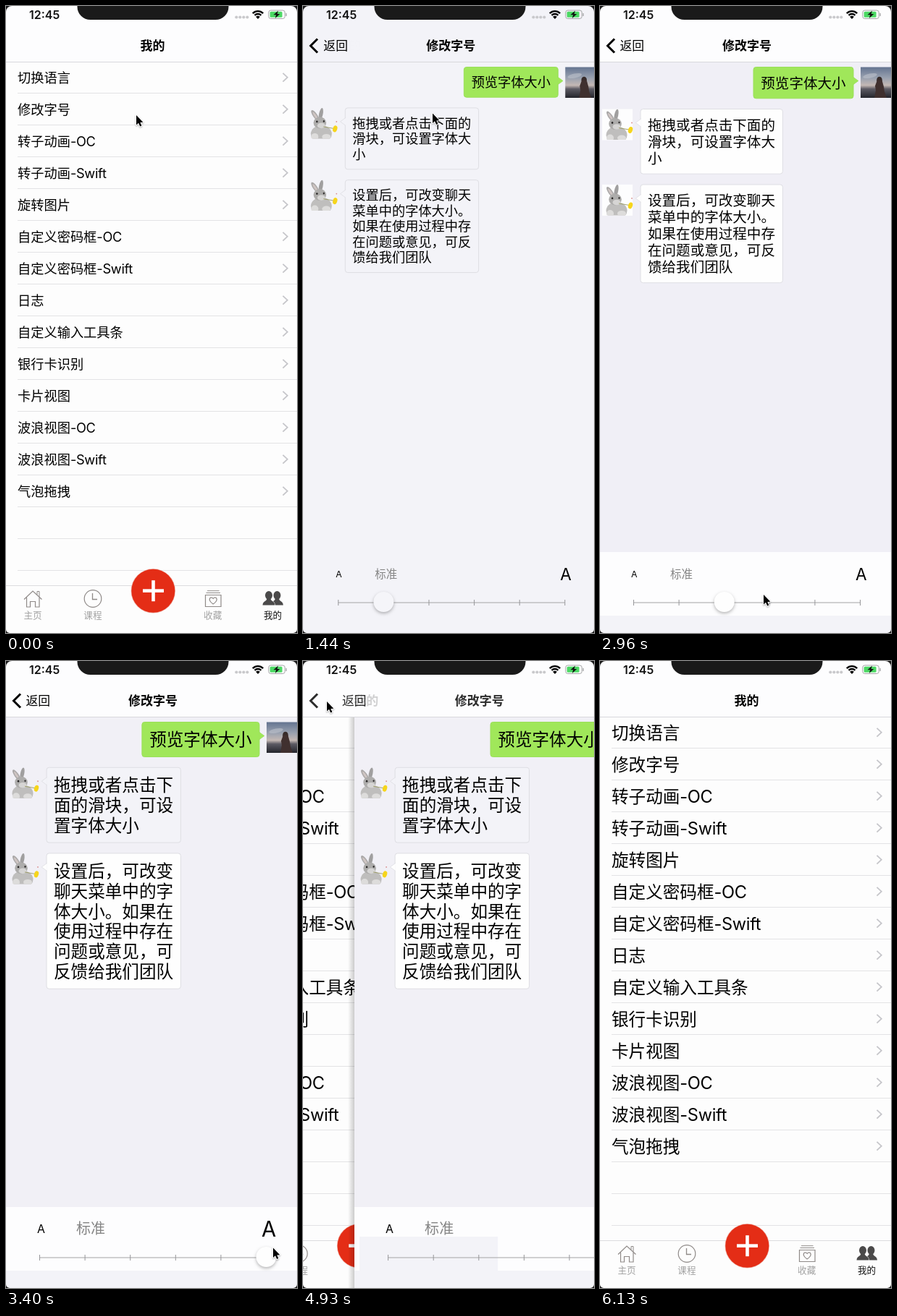
Write an HTML page with a canvas that moves like this. It is 402 by 867 pixels and loops after 6.48 s.

```html
<!DOCTYPE html>
<html lang="zh-CN">
<head>
<meta charset="utf-8">
<style>
html, body { margin: 0; width: 100%; height: 100%; overflow: hidden; background: #fdfdfd; }
canvas { display: block; width: 402px; height: 867px; }
</style>
</head>
<body>
<canvas id="stage" width="402" height="867"></canvas>
<script>
const c = document.getElementById('stage').getContext('2d');
const W = 402, H = 867, LOOP = 6480;
const FONT = 'Inter, "Noto Sans CJK SC", "Noto Sans CJK", sans-serif';
const ROWS = ['切换语言', '修改字号', '转子动画-OC', '转子动画-Swift', '旋转图片',
  '自定义密码框-OC', '自定义密码框-Swift', '日志', '自定义输入工具条', '银行卡识别',
  '卡片视图', '波浪视图-OC', '波浪视图-Swift', '气泡拖拽'];
const MESSAGES = ['拖拽或者点击下面的滑块，可设置字体大小',
  '设置后，可改变聊天菜单中的字体大小。如果在使用过程中存在问题或意见，可反馈给我们团队'];
const PUSH = [1020, 1080, 1200, 1320, 1440, 1550];
const POP = [4930, 5020, 5130, 5230, 5320];
const TICK = 62.6, SLIDER_X = 46.5;

// Pointer moves: start, end, steps, target x, target y, sideways bulge
const MOVES = [
  [290, 490, 3, 179, 149.5, 0], [670, 670, 1, 179, 148.5, 0],
  [1700, 2260, 10, 121.5, 818, 40], [2380, 2380, 1, 121.5, 818.5, 0],
  [2790, 2960, 3, 226, 814, 0], [3050, 3400, 7, 369, 811.5, 0],
  [3450, 3450, 1, 370, 811, 0], [3720, 3980, 5, 20, 101, -12],
  [4300, 4300, 1, 30.5, 65.5, 0], [4510, 4510, 1, 33, 56, 0],
  [5560, 5780, 5, 262, 829, 0], [6020, 6130, 3, 330, 880, 0]
];

const sizeAt = i => (17 + 1.25 * (i - 1)) * W / 375;
const spring = t => t <= 0 ? 1 : (1 + 0.019 * t) * Math.exp(-0.019 * t);
const hold = (times, t) => times.reduce((a, b) => b <= t ? b : a, times[0]);

function pointer(t) {
  let x = 180, y = 151;
  for (const [a, b, n, tx, ty, bulge] of MOVES) {
    if (t < a) break;
    const k = b > a ? Math.min(n, Math.floor((t - a) / (b - a) * (n - 1) + 1e-6) + 1) : n;
    const u = k / n;
    const p = Math.abs(ty - y) > 100 ? u * u * (3 - 2 * u) : u;
    x += (tx - x) * p + bulge * Math.sin(Math.PI * p);
    y += (ty - y) * p;
  }
  return [x, y];
}

// Offset of the chat page from its resting place
function pageX(t) {
  if (t < PUSH[1]) return W;
  if (t < 1550) return W * spring(hold(PUSH, t) - 1056.8);
  if (t < POP[0]) return 0;
  if (t < 5230) return W * (1 - spring(hold(POP, t) - 4890));
  return W;
}

function text(s, x, y, size, color = '#000', weight = 400, align = 'left') {
  c.font = `${weight} ${size}px ${FONT}`;
  c.fillStyle = color;
  c.textAlign = align;
  c.fillText(s, x, y + size * 0.37);
}

function rect(x, y, w, h, color) {
  c.fillStyle = color;
  c.fillRect(x, y, w, h);
}

function line(points, color, width, close) {
  c.beginPath();
  points.forEach(([x, y], i) => i ? c.lineTo(x, y) : c.moveTo(x, y));
  if (close) c.closePath();
  c.strokeStyle = color;
  c.lineWidth = width;
  c.stroke();
}

function poly(points, color) {
  c.beginPath();
  points.forEach(([x, y]) => c.lineTo(x, y));
  c.fillStyle = color;
  c.fill();
}

function oval(x, y, rx, ry, color, turn = 0) {
  c.beginPath();
  c.ellipse(x, y, rx, ry, turn, 0, Math.PI * 2);
  c.fillStyle = color;
  c.fill();
}

function at(x, y, draw) {
  c.save();
  c.translate(x, y);
  draw();
  c.restore();
}

function tabBar() {
  const gray = '#8f8a88';
  rect(0, 801, W, 66, '#fdfdfd');
  rect(0, 801, W, 1, '#dcdcdf');

  line([[25, 820.5], [37, 809], [49.5, 820.5]], gray, 1.2);
  line([[28.5, 818], [28.5, 831], [33.5, 831], [33.5, 823.5], [40.5, 823.5], [40.5, 831],
    [46, 831], [46, 818]], gray, 1.2);
  line([[43, 814], [43, 809.5], [46, 809.5], [46, 817]], gray, 1);

  c.beginPath();
  c.arc(120, 819.5, 11.8, 0, 7);
  c.lineWidth = 1.2;
  c.stroke();
  line([[119.5, 812], [119.5, 820.5], [126, 820.5]], gray, 1.3);

  line([[278, 808.7], [294.5, 808.7]], gray, 1);
  line([[276.5, 811.5], [296, 811.5]], gray, 1);
  line([[275.5, 814.5], [297, 814.5], [297, 830.5], [275.5, 830.5]], gray, 1.2, true);
  c.beginPath();
  c.moveTo(286.2, 827);
  c.bezierCurveTo(277, 820.5, 283, 815, 286.2, 819.5);
  c.bezierCurveTo(289.4, 815, 295.4, 820.5, 286.2, 827);
  c.stroke();

  for (const x of [374.5, 363]) {
    c.beginPath();
    c.ellipse(x, 815, 5, 6, 0, 0, 7);
    c.moveTo(x - 8.5, 828.5);
    c.bezierCurveTo(x - 8, 822, x - 3, 824, x - 2.5, 819);
    c.lineTo(x + 2.5, 819);
    c.bezierCurveTo(x + 3, 824, x + 8, 822, x + 8.5, 828.5);
    c.closePath();
    c.strokeStyle = '#fdfdfd';
    c.lineWidth = 1.2;
    c.stroke();
    c.fillStyle = '#4b4a4a';
    c.fill();
  }
  ['主页', '课程', '', '收藏', '我的'].forEach((s, i) =>
    text(s, 37 + i * 82.9, 842.5, 12.6, i == 4 ? '#111' : '#a2a2a2', 400, 'center'));

  oval(203.3, 808.8, 30.7, 30.7, '#efb0a6');
  oval(203.3, 808.8, 30, 30, '#e42d16');
  rect(189, 806.3, 29, 4.6, '#fff');
  rect(201.2, 794.2, 4.6, 29, '#fff');
}

function list(size, selected) {
  rect(0, 78, W, H - 78, '#fdfdfd');
  if (selected) rect(0, 121, W, 44, '#d5d5d5');
  for (let i = 0; i < 16; i++) rect(16, 120 + 44 * i, W, 1, '#e3e3e5');
  ROWS.forEach((s, i) => {
    const y = 99 + 44 * i, [han, latin] = s.split('-');
    text(han, 16, y, size);
    if (latin) {
      const x = 16 + c.measureText(han).width;
      c.letterSpacing = '-0.3px';
      text('-' + latin, x, y, size);
      c.letterSpacing = '0px';
    }
    line([[382.5, y - 6.2], [388.8, y - 0.3], [382.5, y + 5.6]], '#c6c6ca', 1.8);
  });
  tabBar();
}

function rabbit(y, plate) {
  at(3, y, () => {
    if (plate) rect(0, 0, 42, 43, plate);
    oval(11.5, 10.5, 3, 8.8, '#aaa8a8', -0.6);
    oval(11.8, 11, 1.5, 6.5, '#cfc5c3', -0.6);
    oval(19.5, 8.5, 2.7, 8.5, '#a09f9f', 0.2);
    c.save();
    c.beginPath();
    c.rect(0, 0, 42, 42.5);
    c.clip();
    oval(20, 36, 14.5, 12, '#bfbebd');
    oval(11, 40, 5, 5, '#dddcdb');
    oval(27, 40, 6, 4, '#dddcdb');
    c.restore();
    oval(18, 20.5, 8.8, 8, '#adacab');
    oval(20, 24.5, 5.5, 3.8, '#d6d5d4');
    oval(14, 19, 1.3, 1.4, '#2a2828');
    oval(23.5, 18.5, 1.1, 1.3, '#2a2828');
    line([[23, 26], [37, 28.5]], '#9a9a62', 0.9);
    oval(39, 29, 3, 4.6, '#f6d51c', 0.3);
    oval(41, 19, 0.9, 0.9, '#d88c8c');
  });
}

function portrait() {
  at(360, 84.5, () => {
    const g = c.createLinearGradient(0, 0, 0, 42);
    g.addColorStop(0, '#647490');
    g.addColorStop(0.35, '#98a0af');
    g.addColorStop(0.6, '#c4b8b4');
    g.addColorStop(0.72, '#5c5a63');
    g.addColorStop(1, '#26272e');
    rect(0, 0, 42, 42.5, g);
    oval(13, 12, 10, 3, '#b8bdc8aa', -0.2);
    oval(26, 18, 3.8, 4.8, '#372b2a');
    poly([[23, 18], [29.5, 18], [32, 27], [33, 34], [36, 42.5], [19, 42.5], [21, 32], [20, 26]], '#40302f');
  });
}

function bubble(x, y, w, h, fill, edge, side) {
  c.beginPath();
  c.roundRect(x, y, w, h, 3.5);
  c.fillStyle = fill;
  c.fill();
  c.strokeStyle = edge;
  c.lineWidth = 1;
  c.stroke();
  const bx = side > 0 ? x + w - 0.7 : x + 0.7, ay = y + 19;
  const tip = [[bx, ay - 5.5], [bx + side * 7.5, ay], [bx, ay + 5.5]];
  poly(tip, fill);
  line(tip, edge, 0.8);
}

function chat(t, idx) {
  const flat = t >= 1320 && t < 1550, worn = t >= 3400;
  const size = sizeAt(idx), lh = size * 1.18, cols = Math.floor(182 / size);
  const bg = flat ? '#f3f3f8' : worn ? '#f1f0f6' : '#f0eff6';
  rect(0, 78, W, H - 78, bg);
  if (!flat) {
    rect(0, 755, W, 88, '#fdfdfe');
    rect(0, 843, W, 24, t < 1320 ? '#fdfdfe' : '#f3f3f8');
    if (t >= 3980) rect(7, 796, 191, 47, '#f3f3f8');
  }

  const hello = '预览字体大小', w = size * hello.length + 20.6;
  let y = 84.5;
  bubble(350 - w, y, w, lh + 20.2, '#a0e75a', '#9adf5a', 1);
  text(hello, 360.3 - w, y + 10.3 + lh / 2, size);
  portrait();
  y += lh + 34.9;
  MESSAGES.forEach((s, i) => {
    const n = Math.ceil(s.length / cols), h = n * lh + 20.4;
    rabbit(y, flat || worn ? null : '#fdfdfe');
    bubble(56, y, size * cols + 20.3, h, flat || (worn && !i) ? '#f3f3f8' : '#fefefe', '#dedee3', -1);
    for (let k = 0; k < n; k++)
      text(s.slice(k * cols, k * cols + cols), 66, y + 10.3 + lh * (k + 0.5), size);
    y += h + 14.8;
  });

  const grow = idx > 2 ? size / sizeAt(1) : 1;
  text('A', 43, 785.5, 12.3 * grow);
  text('标准', 97, 785, 15.5 * grow, '#858585');
  text('A', 353, 785.5, 22.6 * grow);
  rect(SLIDER_X, 824.5, TICK * 5, 1, '#a3a3a6');
  for (let i = 0; i < 6; i++) rect(SLIDER_X - 0.5 + i * TICK, 821, 1, 8, '#97979a');
  c.save();
  c.shadowColor = 'rgba(0,0,0,.28)';
  c.shadowBlur = 4;
  c.shadowOffsetY = 2;
  oval(SLIDER_X + idx * TICK, 824, 14, 14, flat ? '#f5f5f9' : '#fefefe');
  c.restore();
}

function navBar(p, flat) {
  rect(0, 0, W, 77, flat ? '#f3f3f8' : '#fdfdfe');
  rect(0, 77, W, 1, '#d8d8dc');
  c.globalAlpha = 1 - p;
  text('我的', 202.5 - 140 * p, 55, 17, '#000', 600, 'center');
  c.globalAlpha = p;
  text('修改字号', 203 + 231 * (1 - p), 55, 17, '#000', 600, 'center');
  line([[20, 45.5], [10.5, 55], [20, 64.5]], '#000', 3);
  text('返回', 27.5 + 150 * (1 - p), 55, 16.8);
  c.globalAlpha = 1;
}

function statusBar() {
  text('12:45', 32, 12, 16, '#111', 600);
  for (let i = 0; i < 4; i++) oval(318.3 + i * 5, 15.5, 2.1, 2.1, '#c9c9cc');
  c.strokeStyle = '#000';
  c.lineWidth = 2.4;
  for (const r of [6.3, 10.2]) {
    c.beginPath();
    c.arc(348, 17.3, r, -Math.PI * 0.75, -Math.PI * 0.25);
    c.stroke();
  }
  poly([[348, 18], [345, 14.8], [348, 13.6], [351, 14.8]], '#000');
  c.beginPath();
  c.roundRect(362.8, 6, 22.5, 11.5, 3);
  c.strokeStyle = '#a5a5a7';
  c.lineWidth = 1;
  c.stroke();
  c.beginPath();
  c.roundRect(364.6, 7.8, 17, 8, 1.5);
  c.fillStyle = '#4cd964';
  c.fill();
  rect(386.5, 10, 1.3, 4, '#a5a5a7');
  poly([[376, 6.5], [369.5, 12.3], [373.2, 12.3], [371.8, 17], [378.3, 11], [374.6, 11]], '#111');
}

function bezel() {
  c.fillStyle = '#1a1a1a';
  c.beginPath();
  c.roundRect(98.5, -20, 209, 39, [0, 0, 18, 18]);
  c.fill();
  c.beginPath();
  c.rect(0, 0, W, H);
  c.roundRect(0, 0, W, H, [8, 8, 5, 5]);
  c.fill('evenodd');
}

function cursor([x, y]) {
  at(x, y, () => {
    const arrow = [[0, 0], [0, 13.5], [3, 10.8], [5.2, 15.6], [7.4, 14.6], [5.3, 10], [9.4, 9.8]];
    c.lineJoin = 'round';
    c.shadowColor = 'rgba(0,0,0,.3)';
    c.shadowBlur = 2;
    c.shadowOffsetY = 1;
    line(arrow, '#fff', 2, true);
    c.shadowColor = 'transparent';
    poly(arrow, '#000');
  });
}

function draw(t) {
  const px = pageX(t), p = 1 - px / W, mouse = pointer(t);
  const flat = t >= 1320 && t < 1550;
  const idx = t < 2790 ? 1 : t >= 3400 ? 5 :
    Math.max(1, Math.min(5, Math.floor((mouse[0] - SLIDER_X) / TICK)));
  const covered = px < 4;
  rect(0, 0, W, H, flat ? '#f3f3f8' : '#fdfdfd');
  if (!covered) at(-0.38 * (W - px), 0, () => list(sizeAt(t < 1700 ? 1 : 5), t >= 1020 && t < 1550));
  if (px < W) {
    if (!covered) {
      const g = c.createLinearGradient(px - 9, 0, px, 0);
      g.addColorStop(0, 'rgba(0,0,0,0)');
      g.addColorStop(1, 'rgba(0,0,0,.2)');
      rect(px - 9, 78, 9, H - 78, g);
    }
    at(px, 0, () => chat(t, idx));
  }
  navBar(p, flat);
  statusBar();
  if (t < 6130) cursor(mouse);
  bezel();
}

const start = performance.now();
function tick() {
  draw((performance.now() - start) % LOOP);
  requestAnimationFrame(tick);
}
tick();
</script>
</body>
</html>
```
